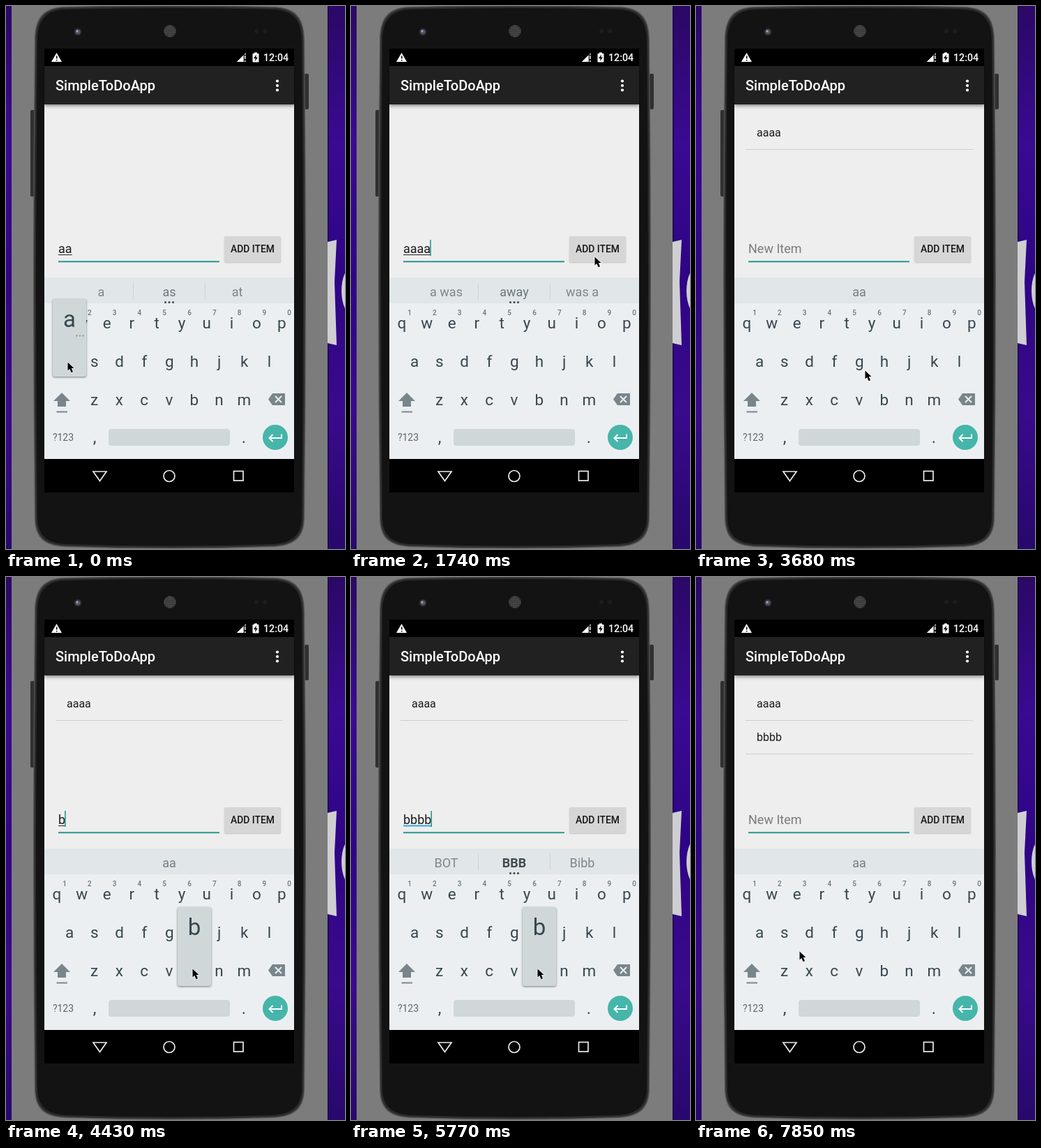
Animation, 486 px wide and 778 px high, one loop 8000 ms. Source, as an HTML page with a canvas:

```html
<!DOCTYPE html>
<html lang="en">
<head>
<meta charset="utf-8">
<title>To-do app demo</title>
<style>
html, body { margin: 0; width: 100%; height: 100%; overflow: hidden; background: #7c7c7c; }
canvas { display: block; width: 486px; height: 778px; }
</style>
</head>
<body>
<canvas id="stage" width="486" height="778"></canvas>
<script>
const g = document.getElementById('stage').getContext('2d');
const LOOP = 8000, STEP = 149.2, FIRST = 240;
const INK = '#37474f', GREY = '#78868c', TEAL = '#26968b';

// Each entry changes part of the state from its time on.
const events = [
  [0, { text: 'aa', caret: 0, words: ['a', 'as', 'at'], key: '', items: 0, ripple: 0, fix: 0 }],
  [0, { key: 'a' }],
  [240, { text: 'aaa', caret: 1 }],
  [390, { key: '', words: ['a as', 'aaa', 'as a'] }],
  [690, { text: 'aaaa', words: ['a was', 'away', 'was a'] }],
  [1290, { caret: 0 }],
  [1740, { caret: 1 }],
  [2040, { text: '', items: 1, words: ['', '', ''], ripple: 1 }],
  [2190, { ripple: 0.5 }],
  [2340, { ripple: 0 }],
  [2640, { caret: 0, words: ['aa'] }],
  [3090, { caret: 1 }],
  [3680, { caret: 0 }],
  [4130, { caret: 1 }],
  [4430, { text: 'b', key: 'b' }],
  [4580, { key: '', words: ['by', 'b', 'be'] }],
  [4730, { text: 'bb', key: 'b' }],
  [4880, { key: '', words: ['Bob', 'bb', 'BB'] }],
  [5030, { text: 'bbb', key: 'b' }],
  [5170, { key: '', words: ['BB', 'bbb', 'Bob'] }],
  [5620, { text: 'bbbb', key: 'b' }],
  [5770, { words: ['BOT', 'BBB', 'Bibb'], fix: 1 }],
  [5920, { key: '' }],
  [6220, { caret: 0 }],
  [6660, { caret: 1 }],
  [6960, { text: '', items: 2, words: ['', '', ''], ripple: 1, fix: 0 }],
  [7110, { ripple: 0.5 }],
  [7260, { ripple: 0 }],
  [7550, { caret: 0, words: ['aa'] }]
];

// Pointer stops: time, x, y
const stops = [
  [0, 88, 510], [990, 88, 510], [1590, 355, 352], [1740, 349, 359], [2490, 349, 359],
  [3680, 242, 522], [4130, 267, 561], [5920, 267, 561], [6660, 341, 348],
  [7260, 341, 348], [7850, 148, 536], [LOOP, 148, 536]
];

function pointerAt(t) {
  const q = t < FIRST ? 0 : FIRST + STEP * Math.floor((t - FIRST) / STEP);
  const i = stops.findIndex(s => s[0] > q);
  const [t0, x0, y0] = stops[i - 1], [t1, x1, y1] = stops[i];
  const u = (q - t0) / (t1 - t0), e = u * u * (3 - 2 * u);
  return [Math.round(x0 + (x1 - x0) * e), Math.round(y0 + (y1 - y0) * e)];
}

function rect(x, y, w, h, color, r = 0) {
  g.fillStyle = color;
  g.beginPath();
  g.roundRect(x, y, w, h, r);
  g.fill();
}

function dot(x, y, r, color) {
  g.fillStyle = color;
  g.beginPath();
  g.arc(x, y, r, 0, 7);
  g.fill();
}

function path(points, closed = true) {
  g.beginPath();
  for (let i = 0; i < points.length; i += 2) g.lineTo(points[i], points[i + 1]);
  if (closed) g.closePath();
}

function poly(points, color) {
  path(points);
  g.fillStyle = color;
  g.fill();
}

function line(points, color, width, closed = false) {
  path(points, closed);
  g.strokeStyle = color;
  g.lineWidth = width;
  g.stroke();
}

function label(s, x, y, size, color, align = 'center', weight = 400) {
  g.font = `${weight} ${size}px Roboto, sans-serif`;
  g.textAlign = align;
  g.fillStyle = color;
  g.fillText(s, x, y);
}

function shade(color, blur, dy, draw) {
  g.save();
  g.shadowColor = color;
  g.shadowBlur = blur;
  g.shadowOffsetY = dy;
  draw();
  g.restore();
}

function body(d, color) {
  g.beginPath();
  g.moveTo(41 + d, 50);
  g.bezierCurveTo(41 + d, 16 + d, 54 + d, 2 + d, 84, 1 + d);
  g.quadraticCurveTo(235, -3 + d, 384, 1 + d);
  g.bezierCurveTo(415 - d, 2 + d, 428 - d, 16 + d, 428 - d, 50);
  g.quadraticCurveTo(432 - d, 390, 428 - d, 735);
  g.bezierCurveTo(427 - d, 762 - d, 414 - d, 773 - d, 384, 775 - d);
  g.quadraticCurveTo(235, 780 - d, 84, 775 - d);
  g.bezierCurveTo(54 + d, 773 - d, 42 + d, 762 - d, 41 + d, 735);
  g.quadraticCurveTo(37 + d, 390, 41 + d, 50);
  g.fillStyle = color;
  g.fill();
}

function drawPhone() {
  rect(0, 0, 486, 778, '#7c7c7c');
  const purple = g.createLinearGradient(0, 0, 0, 778);
  ['#2b0865', '#390a92', '#2e0485', '#390a8c', '#27086c'].forEach((c, i) => purple.addColorStop(i / 4, c));
  rect(0, 0, 8, 778, purple);
  rect(461, 0, 25, 778, purple);
  rect(461, 0, 2, 778, '#210654');
  poly([461, 338, 474, 335, 471, 395, 474, 486, 461, 483], '#cfcfd2');
  g.save();
  g.beginPath();
  g.rect(461, 0, 25, 778);
  g.clip();
  g.beginPath();
  g.ellipse(496, 408, 15, 34, 0, 0, 7);
  g.fillStyle = '#cfcfd2';
  g.fill();
  g.restore();

  rect(35, 149, 6, 124, '#303030', 2);
  rect(428, 97, 6, 51, '#303030', 2);
  body(0, '#505050');
  body(1.5, '#2b2b2b');
  body(4, '#131313');
  dot(103, 37, 5.5, '#29292f');
  dot(103, 37, 3.5, '#595468');
  dot(102, 36, 1.5, '#aaa6be');
  dot(235, 36, 9, '#383838');
  for (let y = -7; y <= 7; y += 2.8)
    for (let x = -7; x <= 7; x += 2.8)
      if (x * x + y * y < 65) dot(235 + x, 36 + y, 0.7, '#696969');
  dot(359, 36, 3, '#1d1d1d');
  dot(371, 36, 3, '#1d1d1d');
}

function drawBars() {
  rect(55, 61, 358, 636, '#eeeeee');
  shade('rgba(0,0,0,.45)', 5, 2, () => rect(55, 86, 358, 55, '#212121'));
  rect(55, 61, 358, 25, '#000');
  poly([72.5, 67, 80, 80, 65, 80], '#fff');
  rect(72, 71.5, 1.5, 4, '#000');
  rect(72, 77, 1.5, 1.5, '#000');
  poly([331, 80, 344, 67, 344, 80], '#b8b8b8');
  poly([331, 80, 340, 71, 340, 80], '#fff');
  rect(341, 70, 3, 11, '#000');
  rect(342, 71, 1.5, 5, '#fff');
  rect(342, 78, 1.5, 2, '#fff');
  rect(353.5, 68, 9, 12.5, '#fff', 1);
  rect(356, 66.5, 4, 2, '#fff');
  poly([358.8, 69.5, 355, 75, 357.6, 75, 357, 79, 361, 73.5, 358.4, 73.5], '#000');
  label('12:04', 369, 79, 14.2, '#fff', 'left', 500);
  label('SimpleToDoApp', 71, 121, 20, '#fff', 'left', 500);
  [107.5, 114, 120.5].forEach(y => dot(389, y, 2.1, '#fff'));

  rect(55, 649, 358, 48, '#000');
  line([125, 667, 144, 667, 134.5, 680.5], '#ececec', 1.7, true);
  g.beginPath();
  g.arc(234, 673.5, 8, 0, 7);
  g.stroke();
  g.strokeRect(326.5, 666.5, 13.5, 13.5);
}

function drawForm(s) {
  ['aaaa', 'bbbb'].slice(0, s.items).forEach((item, i) => {
    label(item, 87, 187 + 48 * i, 16, '#1c1c1c', 'left');
    rect(71, 205 + 48 * i, 326, 1, '#cfcfcf');
  });

  label(s.text || 'New Item', 75, 354, 18, s.text ? '#1c1c1c' : '#7b7b7b', 'left');
  const w = s.text ? g.measureText(s.text).width : 0;
  if (s.fix) rect(75, 355.5, w, 2, '#33a9dd');
  else rect(75, 356, w, 1, '#222');
  if (s.caret) rect(75 + Math.max(0, w - 1), 335, 1.6, 23, TEAL);
  rect(75, 365.3, 231, 1.9, TEAL);

  shade('rgba(0,0,0,.18)', 2, 1, () => rect(313, 330, 81, 37, '#d6d6d6', 2));
  if (s.ripple) {
    g.save();
    g.beginPath();
    g.roundRect(313, 330, 81, 37, 2);
    g.clip();
    g.globalAlpha = s.ripple;
    rect(313, 330, 81, 37, '#cacaca');
    dot(350, 348, s.ripple < 1 ? 50 : 35, '#bababa');
    g.restore();
  }
  label('ADD ITEM', 353.5, 353, 13.9, '#161616', 'center', 500);
}

function drawKeyboard(s) {
  rect(55, 389, 358, 260, '#eceff1');
  rect(55, 389, 358, 37, '#e1e6e9');
  if (s.words.length > 1) {
    [182, 285].forEach(x => rect(x, 397, 1, 23, '#cbd2d6'));
    s.words.forEach((word, i) => {
      const bold = s.fix && i === 1;
      label(word, 136.5 + 97.5 * i, 415.5, 18, bold ? '#414d53' : i === 1 ? '#6b767c' : '#7c878c', 'center', bold ? 700 : 400);
    });
    if (s.words[1]) [228.5, 234, 239.5].forEach(x => dot(x, 424.5, 1.5, '#39434a'));
  } else {
    label(s.words[0], 234, 415.5, 18, '#737e84');
  }

  [['qwertyuiop', 73, 462], ['asdfghjkl', 91, 517], ['zxcvbnm', 126.5, 572]].forEach(([row, x, y]) =>
    [...row].forEach((c, i) => label(c, x + 35.8 * i, y, 22.5, INK)));
  [...'1234567890'].forEach((c, i) => label(c, 84 + 35.8 * i, 443, 10, '#69757b', 'center', 500));

  poly([80, 554, 92, 566, 86, 566, 86, 574, 74, 574, 74, 566, 68, 566], GREY);
  rect(72.5, 580.5, 15.5, 2, GREY);
  poly([376, 563.5, 382, 555, 400, 555, 400, 572, 382, 572], GREY);
  line([386, 559, 395, 568], '#eceff1', 2);
  line([395, 559, 386, 568], '#eceff1', 2);
  label('?123', 82, 623, 14, '#5a686f');
  label(',', 127, 626, 24, INK);
  label('.', 341, 626, 24, INK);
  rect(147, 606, 174, 24, '#cfd7d9', 4);
  dot(386, 618, 18, '#46b5aa');
  line([395, 613.5, 395, 619, 378, 619], '#fff', 2);
  line([382.5, 614, 377.5, 619, 382.5, 624], '#fff', 2);

  if (s.key) {
    const [x, y, h] = s.key === 'a' ? [67, 420, 111] : [246, 473, 113];
    shade('rgba(0,0,0,.5)', 3, 1, () => rect(x, y, 48, h, '#cfd7d9', 3));
    label(s.key, x + 24, y + 40, 33, INK);
    if (s.key === 'a') [101.5, 106, 110.5].forEach(d => dot(d, 472.5, 1.2, '#909ca1'));
  }
}

function drawPointer([x, y]) {
  g.save();
  g.translate(x, y);
  g.lineJoin = 'round';
  const arrow = [0.5, 0.5, 0.5, 12.5, 3.3, 10, 5.6, 15.3, 8, 14.2, 5.8, 9, 9.5, 9];
  line(arrow, 'rgba(255,255,255,.85)', 1.6, true);
  poly(arrow, '#000');
  g.restore();
}

function draw(t) {
  const state = Object.assign({}, ...events.filter(e => e[0] <= t).map(e => e[1]));
  drawPhone();
  drawBars();
  drawForm(state);
  drawKeyboard(state);
  drawPointer(pointerAt(t));
}

const start = performance.now();
function tick() {
  draw((performance.now() - start) % LOOP);
  requestAnimationFrame(tick);
}
tick();
</script>
</body>
</html>
```
